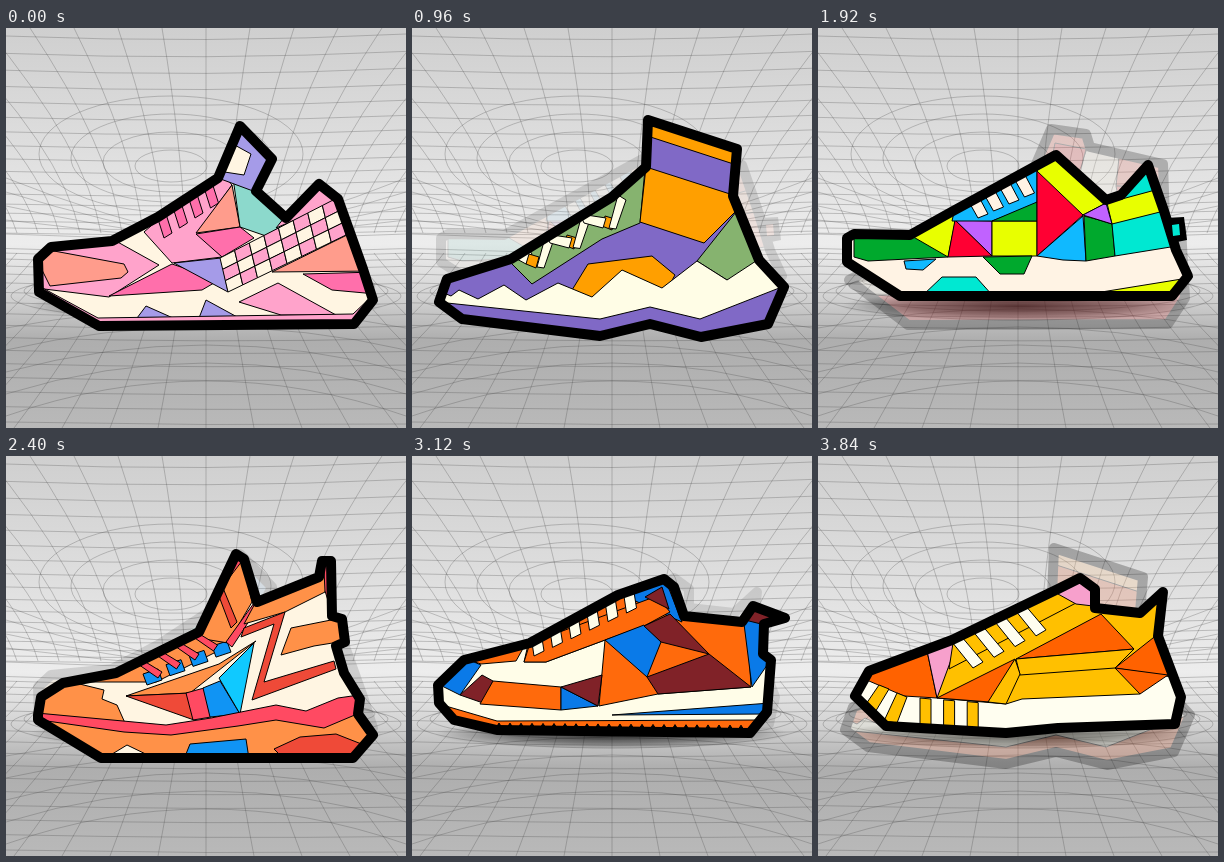
Write an HTML page that moves like this. It is 400 px wide and 400 px high and loops after 4080 ms.

```html
<!DOCTYPE html>
<html lang="en">
<head>
<meta charset="utf-8">
<title>Sneakers</title>
<style>
html, body { margin: 0; width: 100%; height: 100%; overflow: hidden; background: #d4d4d4; }
svg { display: block; width: 100%; height: 100%; }
.grid { fill: none; stroke: #444; stroke-width: .7; opacity: .4; }
.part { stroke: #000; stroke-width: 1; stroke-linejoin: round; }
.edge { fill: none; stroke: #000; stroke-width: 10; stroke-linejoin: round; }
.a { fill: var(--a); } .b { fill: var(--b); } .c { fill: var(--c); } .d { fill: var(--d); }
.e { fill: var(--e); } .f { fill: var(--f); } .g { fill: var(--g); }
.frame { visibility: hidden; animation: show 4.08s step-end infinite; }
@keyframes show {
  0% { visibility: visible; }
  5.88235%, 100% { visibility: hidden; }
}
</style>
</head>
<body>
<svg viewBox="0 0 400 400" preserveAspectRatio="none">
  <defs>
    <linearGradient id="wall" x2="0" y2="1">
      <stop offset="0" stop-color="#cfcfcf"/>
      <stop offset=".3" stop-color="#dedede"/>
      <stop offset=".54" stop-color="#ededed"/>
      <stop offset=".66" stop-color="#d6d6d6"/>
      <stop offset=".78" stop-color="#aeaeae"/>
      <stop offset="1" stop-color="#b9b9b9"/>
    </linearGradient>
    <radialGradient id="shade">
      <stop offset="0" stop-opacity=".75"/>
      <stop offset=".6" stop-opacity=".4"/>
      <stop offset="1" stop-opacity="0"/>
    </radialGradient>
  </defs>
  <rect width="400" height="400" fill="url(#wall)"/>
  <path id="grid" class="grid"/>
  <ellipse cx="200" cy="278" rx="178" ry="15" fill="url(#shade)"/>
  <g id="shoes" visibility="hidden"></g>
  <g id="stage"></g>
</svg>
<script>
const $ = id => document.getElementById(id);
const poly = (cls, pts) => `<polygon class="${cls}" points="${pts}"/>`;
let parts = '';

const part = (slot, pts) => { parts += poly('part ' + slot, pts); };

// Repeat a part n times, shifted by (dx, dy) each time.
function row(slot, pts, n, dx, dy) {
  for (let i = 0; i < n; i++) {
    parts += `<g transform="translate(${i * dx} ${i * dy})">${poly('part ' + slot, pts)}</g>`;
  }
}

// Close a shoe: parts are clipped to the edge, which is inked on top.
function shoe(id, base, edge, behind = '') {
  $('shoes').insertAdjacentHTML('beforebegin', `<defs>
    <clipPath id="${id}-cut"><polygon points="${edge}"/></clipPath>
    <g id="${id}">${poly(base, edge)}<g clip-path="url(#${id}-cut)">${parts}</g>${poly('edge', edge)}${behind}</g>
  </defs>`);
  parts = '';
}

function checker(cols, rows) {
  const at = (c, r) => {
    const u = c / cols, v = r / rows;
    return `${214 + 117 * u + (8 + u) * v},${230 - 60 * u + (34 + 3 * u) * v}`;
  };
  for (let c = 0; c < cols; c++) for (let r = 0; r < rows; r++) {
    part((c + r) % 2 ? 'a' : 'd', [at(c, r), at(c + 1, r), at(c + 1, r + 1), at(c, r + 1)].join(' '));
  }
}

function runner() {
  part('a', '20,200 108,212 153,237 103,269 30,260');
  part('c', '30,230 48,223 118,236 122,244 115,250 44,258');
  part('a', '138,204 212,140 226,157 192,204 216,229 166,235');
  row('b', '151,188 159,183 166,205 158,210', 4, 15.5, -10);
  part('b', '103,268 166,236 213,252 196,262');
  part('e', '168,235 215,230 222,264');
  part('c', '226,157 234,199 190,205');
  part('b', '190,206 234,199 248,210 216,229');
  part('f', '227,150 290,190 260,208 234,199');
  part('a', '270,200 282,185 313,150 340,170');
  checker(8, 3);
  part('c', '266,244 341,207 370,243');
  part('b', '297,246 370,244 370,266 326,262');
  part('a', '233,274 272,255 330,287 275,287');
  part('e', '131,290 140,278 167,290');
  part('e', '193,290 200,272 233,290');
  part('a', '20,251 92,290 347,286 380,255 380,310 20,310');
  part('e', '212,150 200,90 290,90 247,163');
  part('d', '225,115 245,126 238,147 212,143');
  shoe('runner', 'd', '32,231 45,219 106,213 152,189 212,150 234,98 266,131 250,163 280,190 313,156 332,171 357,241 367,272 348,296 93,298 33,264');
}

function boot() {
  part('c', '97,233 112,215 234,130 228,195 190,211 120,256');
  part('b', '234,139 318,166 323,184 292,215 228,194');
  part('b', '220,103 340,142 340,80 220,80');
  part('c', '324,184 360,240 315,252 285,233');
  part('b', '160,262 176,236 240,228 263,247 250,270 170,275');
  part('d', '20,260 39,268 47,262 66,271 92,257 114,272 146,255 180,269 210,242 250,260 285,233 315,252 347,231 380,255 288,291 238,279 188,291 35,275');
  part('d', '103,230 112,215 120,226 114,236');
  row('b', '117,226 127,229 124,240 114,236', 3, 38, -19);
  row('d', '125,239 134,206 142,211 132,240', 3, 36, -19.5);
  row('d', '134,206 160,210 157,220 138,215', 2, 34, -20);
  shoe('boot', 'a', '35,251 99,231 200,169 234,139 236,92 325,121 321,168 347,232 372,259 356,296 289,309 238,296 188,308 50,291 27,274');
}

function trainer() {
  part('b', '119,242 108,190 300,120 360,120 322,238 204,243 188,248');
  part('a', '30,216 108,190 119,242 86,240');
  part('c', '108,190 140,185 119,242');
  part('f', '135,187 240,130 258,147 131,213');
  part('a', '119,242 197,203 172,246');
  part('e', '198,203 283,158 316,193');
  part('f', '198,203 316,193 297,212 202,219');
  part('f', '197,203 202,218 188,248 170,246');
  part('a', '297,212 340,178 360,222');
  part('e', '297,212 350,219 322,238');
  part('c', '240,138 255,110 290,125 275,150 258,148');
  row('d', '134,186 143,180 165,206 155,212', 4, 21, -10.7);
  part('b', '46,251 61,229 71,233 56,258');
  part('b', '66,265 79,237 89,241 79,267');
  row('b', '102,242 113,243 113,270 102,269', 3, 23.6, 1.8);
  shoe('trainer', 'd', '37,240 51,215 134,184 240,133 262,122 277,133 277,152 322,157 345,136 340,180 363,241 357,268 240,272 188,277 68,270');
}

function racer() {
  part('b', '36,200 93,200 130,229 50,233 36,229');
  part('c', '92,207 140,180 130,229');
  part('f', '137,192 174,193 174,228');
  part('e', '137,192 174,228 130,229');
  part('c', '174,193 219,193 219,228 174,228');
  part('d', '134,193 137,180 219,140 219,176 174,193');
  part('b', '174,193 219,174 219,193');
  row('a', '151,174 161,169 170,186 160,190', 4, 15.5, -7);
  part('e', '219,140 265,187 219,228');
  part('c', '219,143 238,120 290,174 265,187');
  part('d', '219,228 265,188 268,233 245,232');
  part('b', '266,188 294,195 297,228 268,233');
  part('g', '275,190 330,120 365,217 297,228 294,196');
  part('c', '289,175 341,161 346,183 294,196');
  part('f', '265,187 288,175 294,196');
  part('d', '86,233 118,231 105,242 88,241');
  part('b', '165,229 214,228 206,246 182,246');
  part('g', '104,268 124,249 158,249 175,268');
  part('c', '265,267 370,250 354,268');
  const tab = poly('', '347,190 366,189 369,212 354,215') + poly('g', '354,197 361,196 362,207 355,208');
  shoe('racer', 'a', '29,210 36,206 92,207 135,183 238,127 288,172 303,167 330,137 346,183 358,222 370,248 354,268 82,268 29,234', tab);
}

function hiker() {
  part('a', '30,258 41,220 98,234 96,243 111,249 119,267');
  part('a', '80,226 205,160 222,190 150,226');
  part('a', '120,240 213,208 250,185 184,237');
  part('d', '120,240 184,237 188,264');
  row('e', '137,218 152,213 156,224 141,229', 4, 23, -9.3);
  part('a', '192,182 217,118 236,105 246,146 222,187');
  part('d', '211,135 217,132 231,166 225,172');
  part('c', '211,124 229,92 236,105 217,130');
  row('c', '129,206 133,202 156,216 152,222', 4, 18.5, -9);
  part('c', '220,186 248,147 253,150 226,191');
  part('a', '238,168 253,140 325,110 319,136 279,156');
  part('d', '238,172 279,156 258,226 328,205 330,213 246,244 268,168 235,181');
  part('a', '285,172 345,160 345,184 308,190 275,199');
  part('c', '317,95 330,95 325,154 319,135');
  part('c', '180,237 198,232 205,261 187,264');
  part('e', '197,232 214,225 234,258 204,261');
  part('f', '213,222 248,187 234,258');
  part('c', '20,256 160,269 205,262 270,249 300,255 332,242 360,238 360,310 20,310');
  part('a', '20,262 118,276 165,279 232,270 270,264 318,272 370,250 370,310 20,310');
  part('b', '98,303 121,289 150,303');
  part('e', '178,303 184,288 240,283 243,303');
  part('d', '268,293 294,281 330,278 358,289 347,300 275,300');
  shoe('hiker', 'b', '32,259 35,241 57,227 110,217 193,176 230,98 238,103 251,146 313,121 316,105 325,105 326,160 336,163 339,186 330,190 338,217 354,243 352,258 367,279 347,302 95,302 32,264');
}

function skater() {
  part('a', '118,180 250,120 335,160 339,231 246,238 187,250 193,184 134,206 112,206');
  part('a', '45,200 118,180 104,205 69,208');
  part('c', '30,230 48,200 69,209 48,239');
  part('d', '48,239 70,219 81,225 71,247');
  part('a', '81,225 149,231 149,254 68,248');
  part('c', '149,231 186,250 149,254');
  part('d', '149,231 190,219 186,250');
  part('c', '215,141 250,115 270,166 245,155');
  part('a', '193,184 134,206 112,206 118,187 245,140 258,156 232,170');
  part('d', '233,141 250,131 257,153');
  part('c', '193,184 232,169 249,186 235,221');
  part('d', '232,170 258,158 297,198 249,186');
  part('d', '235,221 297,198 339,231 246,238');
  part('c', '331,160 351,160 360,202 340,231');
  part('d', '333,164 343,145 380,161 357,170');
  row('b', '119,180 129,176 132,195 122,200', 6, 18.5, -8.6);
  part('c', '200,259 358,247 354,258');
  part('a', '20,246 85,265 350,264 338,290 20,290');
  row('k', '82,275 87,267 92,275', 23, 11, .1);
  shoe('skater', 'b', '26,229 52,204 118,187 206,139 252,123 262,131 272,160 330,166 341,150 373,162 352,168 351,198 359,204 355,256 338,277 85,274 42,264 27,247');
}

function court() {
  part('a', '212,150 233,90 275,105 250,170');
  part('c', '237,115 268,121 262,145 232,140');
  part('a', '302,120 355,130 350,160 298,158');
  part('c', '298,158 355,160 346,200 310,222');
  part('c', '130,195 212,140 250,170 180,226');
  part('d', '180,226 250,170 280,238 200,250');
  part('c', '20,268 365,262 350,310 20,310');
  shoe('court', 'b', '31,252 130,202 212,150 233,101 268,106 272,119 345,136 347,192 363,200 367,270 350,296 90,297');
}

runner(); boot(); trainer(); racer(); hiker(); skater(); court();

const palettes = {
  candy: '#ffa3cb #ff6fab #ff9c8c #fff5e2 #a59be8 #8cd9cc',
  mint: '#8ed8c8 #3fb8a8 #ffd080 #fff5e2 #8cc4f0 #a59be8',
  grape: '#8069c6 #ff9f00 #86b36f #fffde6',
  sand: '#e87850 #ffc890 #78b8b0 #fffde6',
  flag: '#ff0030 #ff0030 #ff6200 #fffef0 #78b4ff #78b4ff',
  sun: '#ff6200 #ffc000 #f7a0cc #fffef0 #ff6200 #ffc000',
  stone: '#a8a8b8 #d0d0d8 #c8c8c8 #fffef0 #90a0b8 #b8b8c8',
  bright: '#fff3e4 #00a92d #e8ff00 #10b9ff #ff0033 #c062ff #00e8d2',
  peach: '#fff3e4 #70c8b8 #ffb890 #88c8e8 #ff8070 #d0a0e0 #ff9c80',
  ember: '#ff9148 #fff5e2 #ff4a62 #ef4a38 #1094f4 #10c9ff',
  rust: '#ff6a0c #fffde8 #0a7ae8 #802228',
  teal: '#20b0a0 #fffde8 #ffb020 #383888',
  brick: '#f07868 #fff5e2 #e84848 #70c0e8'
};

// shoe, palette, opacity of the shoe left behind, how many steps back it is
const frames = `runner candy
hiker teal .12
boot sand .12
racer peach .15
boot grape .12
trainer stone .18
trainer flag .07 2
court brick .15
racer bright .22
runner mint .15
hiker ember .12
skater teal .15
trainer stone .15
skater rust .1
racer peach .15
boot sand .15
trainer sun .25`.split('\n').map(line => line.split(' '));

function look([id, palette], opacity = 1) {
  const vars = palettes[palette].split(' ').map((c, i) => `--${'abcdefg'[i]}:${c}`).join(';');
  return `<use href="#${id}" opacity="${opacity}" style="${vars}"/>`;
}

$('stage').innerHTML = frames.map((f, i) => {
  const [, , fade, back = 1] = f;
  const ghost = fade ? look(frames[i - back], fade) : '';
  const delay = i ? (i - frames.length) * 240 : 0;
  return `<g class="frame" style="animation-delay:${delay}ms">${ghost}${look(f)}</g>`;
}).join('');

// Ceiling and floor mesh meeting at the horizon, with rings around the wells.
function mesh() {
  const d = [];
  const ring = (x, y, rx, ry) => d.push(`M${x - rx} ${y}a${rx} ${ry} 0 1 0 ${2 * rx} 0a${rx} ${ry} 0 1 0 ${-2 * rx} 0`);
  for (let i = -16; i <= 16; i++) {
    d.push(`M${200 + 44 * i} 0Q${200 + 24 * i} 120 ${200 + 21 * i} 205`);
    d.push(`M${200 + 21 * i} 225Q${200 + 27 * i} 290 ${200 + 48 * i} 400`);
  }
  for (let k = 1; k <= 17; k++) {
    const s = (k / 17) ** 1.5;
    d.push(`M0 ${208 - 200 * s}Q200 ${212 - 196 * s} 400 ${206 - 200 * s}`);
    d.push(`M0 ${218 + 176 * s}Q200 ${226 + 172 * s} 400 ${218 + 178 * s}`);
  }
  for (let k = 0; k < 4; k++) {
    ring(165, 126 + 4 * k, 132 - 32 * k, 58 - 14 * k);
    ring(200, 268 - 5 * k, 195 - 13 * k, 24 - 4 * k);
  }
  for (let k = 0; k < 5; k++) {
    d.push(`M0 ${150 + 14 * k}Q100 ${190 + 5 * k} 200 212Q300 ${190 + 5 * k} 400 ${150 + 14 * k}`);
    d.push(`M0 ${300 + 22 * k}Q200 ${262 + 14 * k} 400 ${300 + 22 * k}`);
  }
  return d.join('');
}
$('grid').setAttribute('d', mesh());
</script>
</body>
</html>
```
